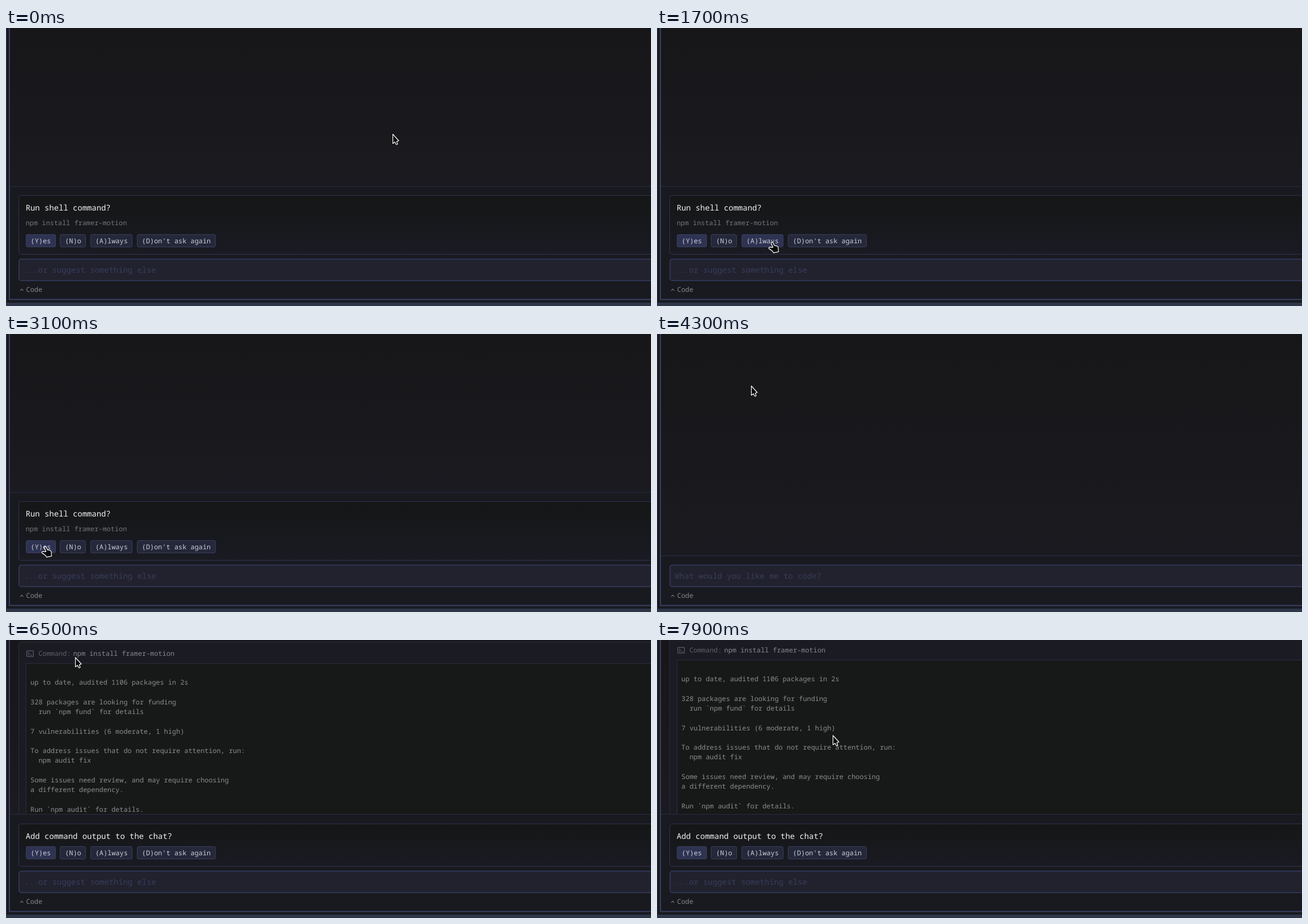
An HTML page for the animation above (8000 ms loop, 1138 by 492 pixels).

```html
<!DOCTYPE html>
<html lang="en">
<head>
<meta charset="utf-8">
<title>Shell command prompt</title>
<style>
  html, body { margin: 0; width: 100%; height: 100%; overflow: hidden; background: #191a20; }
  svg { display: block; width: 100vw; height: 100vh; }
  text { font: 11.92px "Noto Sans Mono", "DejaVu Sans Mono", monospace; text-rendering: geometricPrecision; white-space: pre; }
  .title { font-size: 13.9px; fill: #f2f3f5; }
  .hint { font-size: 13.9px; fill: #393d5c; }
  .dim { fill: #75767b; }
  .label { fill: #5f6069; }
  .cmd { fill: #87888e; }
  .out text { fill: #8b8c8e; }
  .line { stroke: #292c41; }
  .card { fill: url(#cardFill); stroke: #2f3350; }
  .btn rect { fill: #25283a; stroke: #393e5b; }
  .btn.on rect { fill: #2f3353; }
  .btn text { fill: #cacdd6; }
  .cursor path { fill: #08080a; stroke: #fff; stroke-width: 1.2; stroke-linejoin: round; }
</style>
</head>
<body>
<svg viewBox="0 0 1138 492">
  <defs>
    <linearGradient id="chatFill" x2="0" y2="1">
      <stop stop-color="#17171a"/>
      <stop offset=".65" stop-color="#19191d"/>
      <stop offset="1" stop-color="#1a1a20"/>
    </linearGradient>
    <linearGradient id="cardFill" x2="0" y2="1">
      <stop stop-color="#151616"/>
      <stop offset="1" stop-color="#1a1b23"/>
    </linearGradient>
    <clipPath id="chatClip"><rect id="clipBox" x="7" width="1131" height="392"/></clipPath>
  </defs>

  <!-- window frame -->
  <rect width="1138" height="492" fill="#191a20"/>
  <rect width="1" height="492" fill="#2d3748"/>
  <rect y="486" width="1138" height="6" fill="#2d3748"/>
  <path d="M6 -2V480.5H1140" fill="none" stroke="#393f62" stroke-width="2"/>

  <!-- chat -->
  <rect id="chat" x="7" width="1131" height="392" fill="url(#chatFill)"/>
  <g clip-path="url(#chatClip)">
    <g id="entry">
      <rect id="entryBox" x="22.5" y="3.5" width="1140" height="41" rx="4" fill="#1b1b23" stroke="#2a2b3c"/>
      <g fill="none" stroke="#5d5e6b" stroke-width="1.2">
        <rect x="36.6" y="19.1" width="11.8" height="10" rx="1"/>
        <path d="M39 21.8l2.3 2.2-2.3 2.2M42.6 26.5h3.4"/>
      </g>
      <text class="label" x="57.2" y="28">Command:</text>
      <text class="cmd" x="118.6" y="28">npm install framer-motion</text>
      <g id="output" class="out">
        <rect x="35.5" y="41.5" width="1120" height="300" fill="#171818" stroke="#2a2c40"/>
      </g>
    </g>
  </g>
  <path id="divider" class="line" d="M7 .5H1138"/>

  <!-- prompt -->
  <g id="prompt">
    <rect id="promptBox" class="card" x="22.5" width="1140" rx="4"/>
    <text id="title" class="title" x="34.7"></text>
    <text id="shell" class="dim" x="34.7" y="349">npm install framer-motion</text>
    <g id="buttons"></g>
  </g>

  <!-- input -->
  <rect x="23" y="409" width="1140" height="38" rx="4" fill="#21222e" stroke="#2f3451" stroke-width="2"/>
  <text id="hint" class="hint" x="31.5" y="432.5"></text>
  <path d="M25.2 465l2.6-3 2.6 3" fill="none" stroke="#85868c" stroke-width="1.1"/>
  <text x="35.5" y="467" fill="#85868c">Code</text>

  <g id="cursor" class="cursor">
    <path id="arrow" d="M0 .5V17L3.6 14.2 5.5 18Q6 19 7.3 18.5L8.4 18 6.8 13.4 10.4 12Z"/>
    <path id="hand" d="M-1 2Q-.4 -.2 1.8 1L4.6 6.6 9 7.2Q11.2 8 11.4 10.2L11.8 17.6 3.2 19.4Q1 15.2 -4.6 12.4Q-6.4 10.2 -3.8 9.4L2 9.8Z"/>
  </g>
</svg>
<script>
const NS = 'http://www.w3.org/2000/svg';
const $ = id => document.getElementById(id);
const show = (id, on) => $(id).style.display = on ? '' : 'none';
const set = (id, attrs) => { for (const k in attrs) $(id).setAttribute(k, attrs[k]); };

function add(parent, tag, attrs, text = '') {
  const el = document.createElementNS(NS, tag);
  for (const k in attrs) el.setAttribute(k, attrs[k]);
  el.textContent = text;
  return parent.appendChild(el);
}

const CHAR = 7.152, LINE = 17.3;

const log = `up to date, audited 1106 packages in 2s

328 packages are looking for funding
  run \`npm fund\` for details

7 vulnerabilities (6 moderate, 1 high)

To address issues that do not require attention, run:
  npm audit fix

Some issues need review, and may require choosing
a different dependency.

Run \`npm audit\` for details.`;
log.split('\n').forEach((row, i) => {
  const indent = row.length - row.trimStart().length;
  add($('output'), 'text', { x: 43.1 + indent * CHAR, y: 79 + i * LINE }, row.trim());
});

let left = 35;
const buttons = ['(Y)es', '(N)o', '(A)lways', "(D)on't ask again"].map((label, i) => {
  const w = label.length * CHAR + 17, x = left;
  const el = add($('buttons'), 'g', { class: 'btn' });
  add(el, 'rect', { x: Math.floor(x) + .5, y: 365.5, width: Math.round(w) - 1, height: 22, rx: 2.5 });
  add(el, 'text', { x: x + 8.5, y: 381 }, label);
  left += w + 7.9;
  return { el, x, w, main: i === 0 };
});

const smooth = p => p * p * (3 - 2 * p);
const out = p => p * (2 - p);

// pointer stops: time, x, y, easing towards the stop
const path = [
  [0, 682, 187], [100, 682, 187], [800, 27, 379], [900, 29, 377],
  [1300, 29, 377], [2100, 374, 378], [2300, 374, 378], [2400, 346, 378],
  [3100, 68, 375, out], [3800, 68, 375], [4300, 166, 91], [4400, 169, 84],
  [4500, 169, 84], [4600, 170, 83], [4900, 170, 83], [5000, 172, 80],
  [5400, 106, 34, out], [6200, 106, 34], [6300, 107, 33],
  [6400, 112, 32], [6500, 122, 30], [7100, 298, 84], [7500, 310, 168], [8000, 310, 168]
];

function pointer(t) {
  const i = path.findIndex(k => k[0] > t);
  const [t0, x0, y0] = path[i - 1], [t1, x1, y1, ease = smooth] = path[i];
  const p = ease((t - t0) / (t1 - t0));
  return [x0 + (x1 - x0) * p, y0 + (y1 - y0) * p].map(Math.round);
}

function draw(t) {
  const asking = t < 3600, done = t >= 6400, prompt = asking || done;
  const edge = asking ? 280 : done ? 308 : 392;

  set('chat', { height: edge });
  set('clipBox', { height: edge });
  set('divider', { transform: `translate(0 ${edge})` });

  show('entry', t >= 4400);
  show('output', done);
  set('entryBox', { height: done ? 360 : 41 });
  set('entry', { transform: `translate(0 ${t >= 7900 ? -6 : 0})` });

  show('prompt', prompt);
  show('shell', asking);
  const top = asking ? 296.5 : 325.5;
  set('promptBox', { y: top, height: 400.5 - top });
  set('title', { y: asking ? 323 : 352 });
  $('title').textContent = asking ? 'Run shell command?' : 'Add command output to the chat?';
  $('hint').textContent = prompt ? '...or suggest something else' : 'What would you like me to code?';

  const [x, y] = pointer(t);
  let over = false;
  for (const b of buttons) {
    const hit = prompt && x > b.x && x < b.x + b.w && y > 365 && y < 388;
    b.el.classList.toggle('on', b.main || hit);
    over = over || hit;
  }
  show('arrow', !over);
  show('hand', over);
  set('cursor', { transform: `translate(${x + .5} ${y + .5})` });
}

const start = performance.now();
let last = -1;
function tick() {
  const t = Math.floor((performance.now() - start) % 8000 / 100) * 100;
  if (t !== last) draw(last = t);
  requestAnimationFrame(tick);
}
tick();
</script>
</body>
</html>
```
